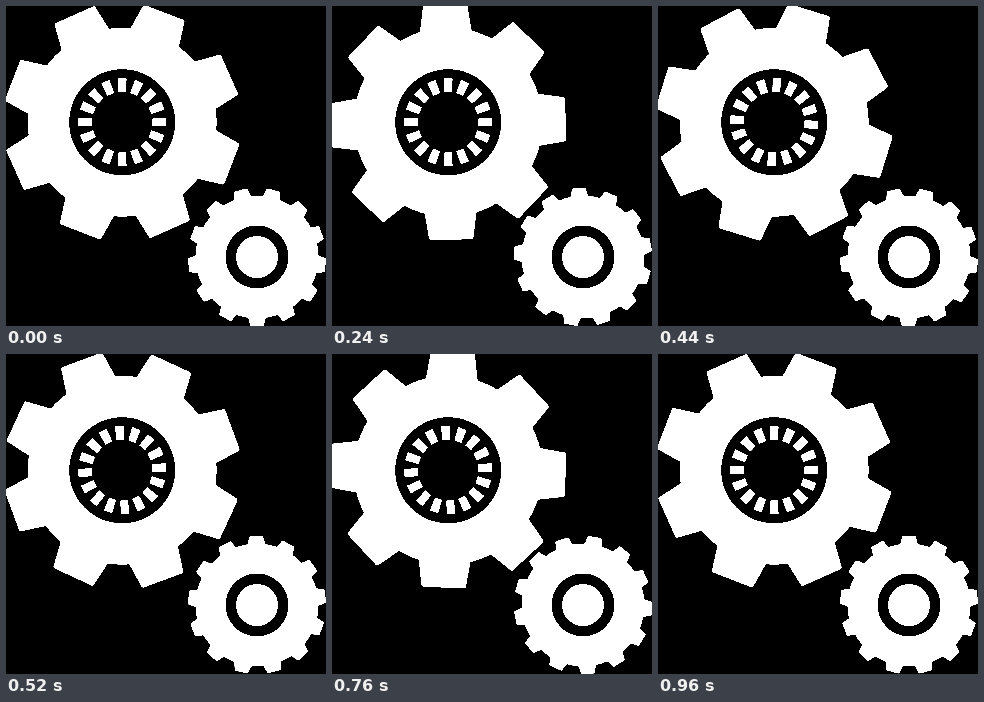
Write an HTML page with a canvas that moves like this. It is 320 px wide and 320 px high and loops after 1000 ms.

```html
<!DOCTYPE html>
<html>
<head>
<meta charset="utf-8">
<title>Gears</title>
<style>
html, body { margin: 0; width: 100%; height: 100%; overflow: hidden; background: #000; }
/* High contrast gives the hard, stepped edges. */
canvas { display: block; width: 100vw; height: 100vh; filter: contrast(30); }
</style>
</head>
<body>
<canvas id="stage" width="320" height="320"></canvas>
<script>
const ctx = document.getElementById('stage').getContext('2d');
const LOOP = 1000, STEP = 40, TURN = 3.75;

function disc(r, color) {
  ctx.fillStyle = color;
  ctx.beginPath();
  ctx.arc(0, 0, r, 0, 2 * Math.PI);
  ctx.fill();
}

// Runs draw() once per spoke, turned around the current centre.
function around(count, degrees, draw) {
  ctx.save();
  ctx.rotate(degrees * Math.PI / 180);
  for (let i = 0; i < count; i++) {
    draw();
    ctx.rotate(2 * Math.PI / count);
  }
  ctx.restore();
}

// Tapered spoke from the inner to the outer radius, with rounded corners.
function spoke(inner, outer, halfInner, halfOuter, round) {
  ctx.beginPath();
  ctx.moveTo(-halfInner + round, -inner);
  ctx.lineTo(-halfOuter + round, -outer + round);
  ctx.lineTo(halfOuter - round, -outer + round);
  ctx.lineTo(halfInner - round, -inner);
  ctx.closePath();
  ctx.fill();
  if (round) {
    ctx.lineWidth = 2 * round;
    ctx.stroke();
  }
}

function at(x, y, draw) {
  ctx.save();
  ctx.translate(x, y);
  draw();
  ctx.restore();
}

function render(time) {
  const n = Math.floor(time % LOOP / STEP);
  ctx.fillStyle = '#000';
  ctx.fillRect(0, 0, 320, 320);
  ctx.strokeStyle = '#fff';
  ctx.lineJoin = 'round';

  at(116.2, 116.2, () => {
    disc(94.5, '#fff');
    around(8, 21 + TURN * n, () => spoke(88, 117.5, 26.3, 22.3, 2));
    disc(53, '#000');
    ctx.fillStyle = '#fff';
    around(16, -TURN * n, () => spoke(30, 44, 3.8, 4.4, 0));
  });

  at(251, 251, () => {
    disc(61.5, '#fff');
    around(13, 180 / 13 - 2 * TURN * n, () => spoke(58, 69, 9.5, 7, 1));
    disc(31.5, '#000');
    disc(21, '#fff');
  });
}

function tick() {
  render(performance.now());
  requestAnimationFrame(tick);
}
tick();
</script>
</body>
</html>
```
